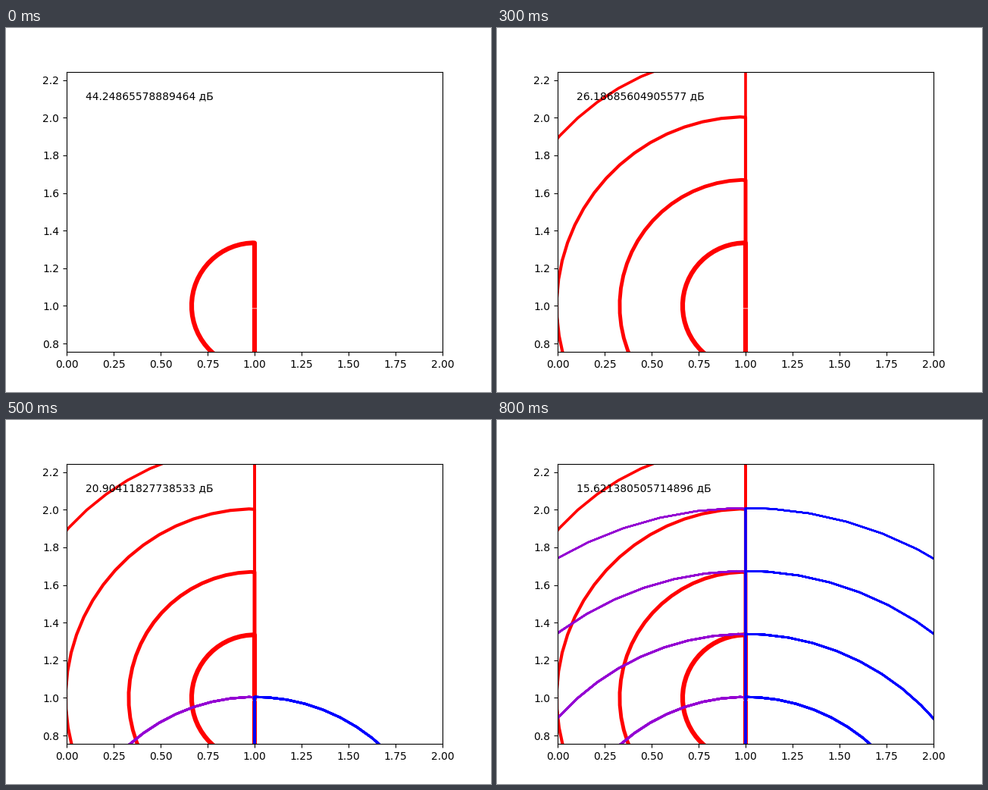
Write a matplotlib script that moves like this. It is 640 px wide and 480 px high and loops after 0.9 s.

```python
import math

import numpy as np
import matplotlib.pyplot as plt
from matplotlib.animation import FuncAnimation

FRAMES = 9
STEP = 0.335    # distance the wave covers per frame
DELAY = 3       # frames until the floor sends the wave back
WALL = 1.0
PASSES = 12     # echoes are stroked repeatedly, which hardens their edges

ANGLES = np.arange(0, 2 * np.pi, 0.1)


def level(i):
    """Sound level in dB at the wave front after i + 1 steps."""
    return 30 - 30 * math.log10(STEP * (i + 1))


fig, ax = plt.subplots(figsize=(6.4, 4.8), dpi=100)
half = 369.6 / 496      # equal scale on both axes
ax.set(xlim=(0, 2), ylim=(1.5 - half, 1.5 + half), autoscale_on=False)
label = ax.text(0.1, 2.1, "")


def add_wave(y, radius, clamp, color, width):
    """Circle around (WALL, y), pressed flat against the wall on one side."""
    xs = clamp(WALL + radius * np.cos(ANGLES), WALL)
    ys = y + radius * np.sin(ANGLES)
    return ax.plot(xs, ys, color=color, lw=width)[0]


def add_step(i):
    """All lines that appear in step i."""
    width = level(i) / 10
    lines = [add_wave(1, STEP * (i + 1), np.minimum, "red", width)]
    if i >= DELAY:
        radius = STEP * (i + 1 - DELAY)
        for clamp, color in ((np.minimum, "darkviolet"), (np.maximum, "blue")):
            lines += [add_wave(0, radius, clamp, color, width)
                      for _ in range(PASSES)]
    return lines


steps = [add_step(i) for i in range(FRAMES)]


def update(frame):
    for i, lines in enumerate(steps):
        for line in lines:
            line.set_visible(i <= frame)
    label.set_text(f"{level(frame)} дБ")
    return [label, *(line for lines in steps for line in lines)]


anim = FuncAnimation(fig, update, frames=FRAMES, interval=100,
                     init_func=lambda: update(0), repeat=True, repeat_delay=0)
plt.show()
```
